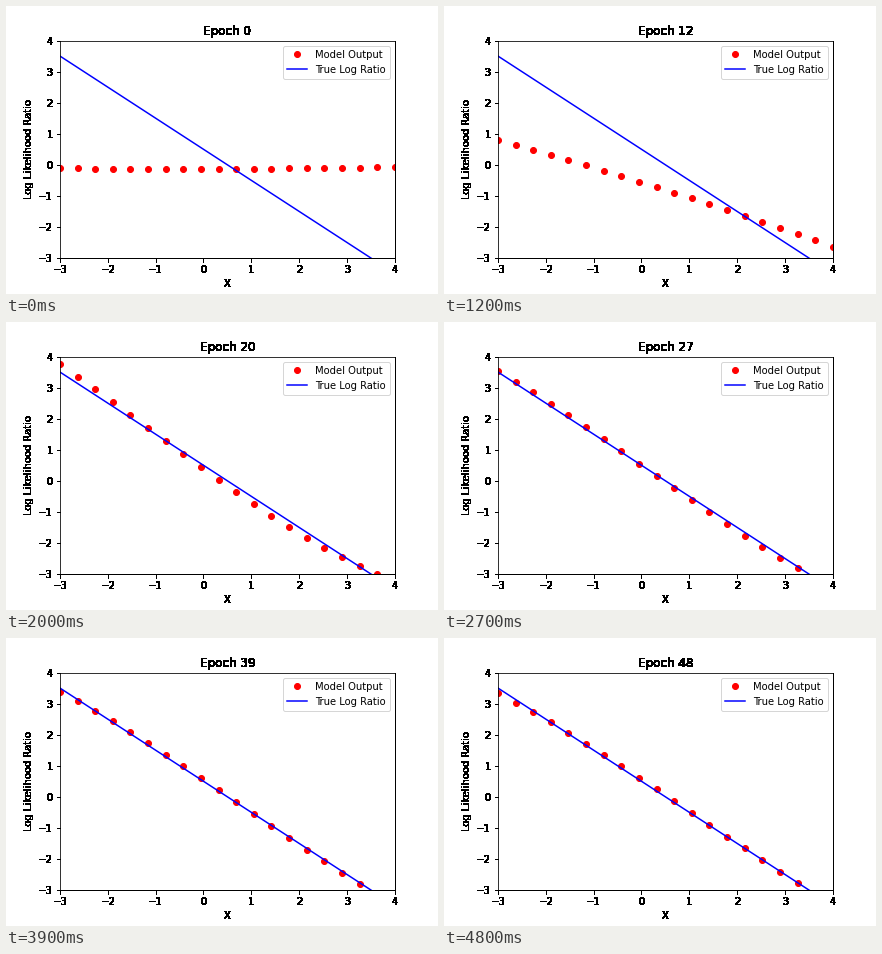
A matplotlib script that plays this animation: 432 by 288 pixels, repeating every 4900 ms.

```python
import numpy as np
import matplotlib.pyplot as plt
from matplotlib.animation import FuncAnimation

plt.rcParams.update({
    "font.family": "DejaVu Sans",
    "font.size": 10,
    "figure.subplot.bottom": 0.125,
})

EPOCHS = 49
XS = np.linspace(-3, 4, 20)
U = np.linspace(-1, 1, 20)

# The fit is a cubic in U; each coefficient eases through a few key epochs
KEYS = np.array([0, 7, 12, 16, 20, 27, 48])
OFFSET = [-0.13, -0.36, -0.81, -0.64, -0.16, -0.04, 0.05]
SLOPE = [0.02, -0.37, -1.72, -2.64, -3.80, -3.76, -3.60]
BEND = [0.04, -0.02, -0.10, 0.125, 0.43, 0.095, -0.12]
TWIST = [0, 0, 0, 0.12, 0.32, 0.29, 0.20]


def ease(track, epoch):
    """Smooth cubic path through the values of a track at KEYS."""
    i = min(np.searchsorted(KEYS, epoch, side="right") - 1, len(KEYS) - 2)
    h = KEYS[i + 1] - KEYS[i]
    t = (epoch - KEYS[i]) / h
    v = np.gradient(track, KEYS) * h
    return ((1 + 2 * t) * (1 - t) ** 2 * track[i]
            + t * (1 - t) ** 2 * v[i]
            + t ** 2 * (3 - 2 * t) * track[i + 1]
            + t ** 2 * (t - 1) * v[i + 1])


def model(epoch):
    tracks = (TWIST, BEND, SLOPE, OFFSET)
    return np.polyval([ease(track, epoch) for track in tracks], U)


def harden(img, dpi):
    """Make every touched pixel opaque, for jagged heavy lettering."""
    out = img.copy()
    out[..., 3] = img[..., 3] > 0
    return out, 0, 0


fig, ax = plt.subplots(figsize=(6, 4), dpi=72, facecolor="white")
dots, = ax.plot(XS, model(0), "o", color="red", label="Model Output")
ax.plot(XS, 0.5 - XS, color="blue", label="True Log Ratio")
ax.set(xlim=(-3, 4), ylim=(-3, 4), xlabel="X", ylabel="Log Likelihood Ratio")
ax.legend(loc="upper right")
title = ax.set_title("Epoch 0")
for part in (ax.xaxis, ax.yaxis, title, ax.spines.bottom, ax.spines.right):
    part.set_agg_filter(harden)


def update(epoch):
    dots.set_ydata(model(epoch))
    title.set_text(f"Epoch {epoch}")
    return dots, title


anim = FuncAnimation(fig, update, frames=EPOCHS, interval=100,
                     repeat=True, repeat_delay=0)
plt.show()
```
